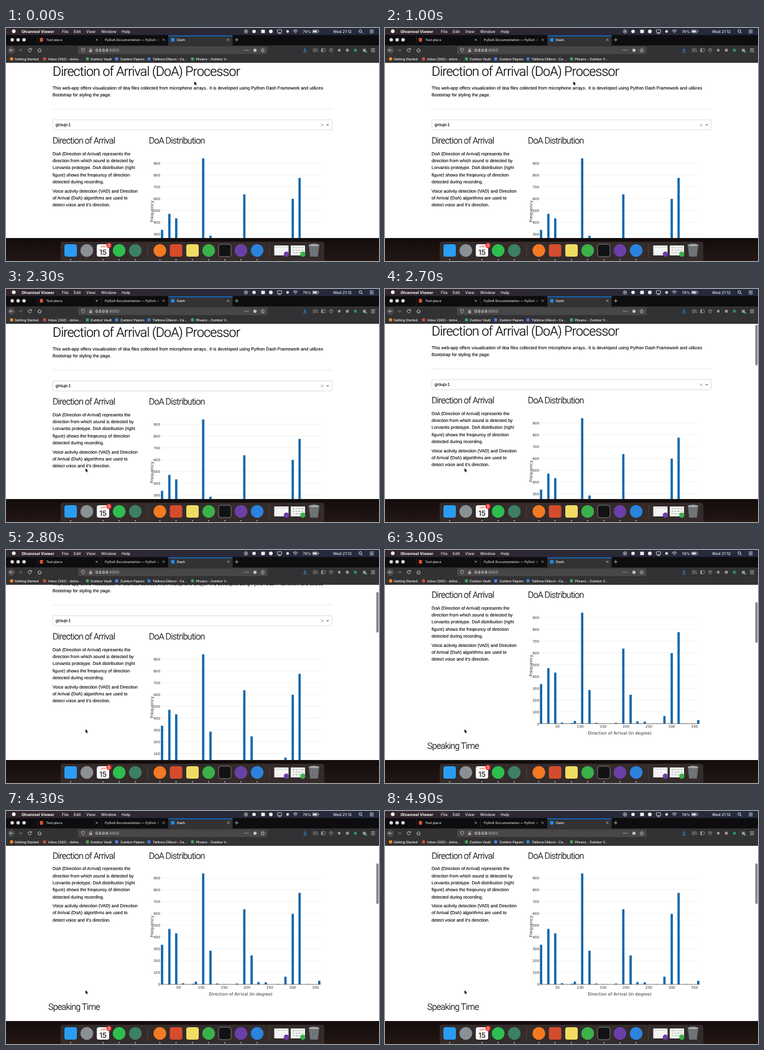
These frames come from a looping animation (600 by 375 pixels, 5 s). An HTML page:

```html
<!DOCTYPE html>
<html lang="en">
<head>
<meta charset="utf-8">
<title>Direction of Arrival (DoA) Processor</title>
<style>
html, body { margin: 0; width: 100%; height: 100%; overflow: hidden; background: #000; }
svg { display: block; width: 600px; height: 375px; }
text { text-rendering: geometricPrecision; white-space: pre; }
.ui { font-family: Inter, "Open Sans", sans-serif; font-weight: 500; }
.body { font-family: "Liberation Sans", Arial, sans-serif; font-size: 7.11px; fill: #000; stroke: #000; stroke-width: .1px; }
.h1, .h3 { font-family: Roboto, Inter, sans-serif; font-weight: 300; fill: #000; stroke: #000; stroke-width: .15px; }
.h1 { font-size: 21.3px; letter-spacing: -.78px; }
.h3 { font-size: 14.2px; letter-spacing: -.69px; }
.plot { font-family: "DejaVu Sans", Verdana, sans-serif; font-size: 5.66px; fill: #2a2a2a; }
.axis { font-size: 6.74px; }
</style>
</head>
<body>
<svg id="stage" viewBox="0 0 600 375" xmlns="http://www.w3.org/2000/svg"></svg>
<script>
const LOOP = 5000, STEP = 100;

// [time, x, y] of the pointer and [time, offset] of the page
const POINTER = [[0, 303, 86], [1200, 303, 86], [1500, 244, 160], [1800, 168, 251], [2300, 128, 288.5], [LOOP, 128, 288.5]];
const SCROLL = [[0, 0], [2600, 0], [2700, 2], [2800, 42], [2900, 92], [3000, 109], [3800, 109], [3900, 109.5], [LOOP, 109.5]];
const BAR_ON = 2600;

const BARS = [[14, 335], [30, 470], [45, 432], [60, 9], [82, 5], [88, 23], [104, 940], [120, 285], [135, 7], [150, 2],
  [178, 7], [194, 636], [210, 245], [225, 19], [241, 17], [268, 2], [284, 65], [300, 597], [315, 775], [333, 2], [358, 30]];

const rect = (x, y, w, h, fill, r = 0, more = "") =>
  `<rect x="${x}" y="${y}" width="${w}" height="${h}" rx="${r}" fill="${fill}" ${more}/>`;
const disc = (x, y, r, fill, more = "") => `<circle cx="${x}" cy="${y}" r="${r}" fill="${fill}" ${more}/>`;
const line = (d, color = "#c9c9cb", w = .9) =>
  `<path d="${d}" fill="none" stroke="${color}" stroke-width="${w}" stroke-linecap="round" stroke-linejoin="round"/>`;
const text = (x, y, str, cls, more = "") => `<text x="${x}" y="${y}" class="${cls}" ${more}>${str}</text>`;
const ui = (x, y, str, size, fill = "#eee", more = "") =>
  text(x, y, str, "ui", `font-size="${size}" fill="${fill}" ${more}`);
const cross = (x, y, r, color, w = .7) =>
  line(`M${x - r} ${y - r}l${2 * r} ${2 * r}M${x + r} ${y - r}l${-2 * r} ${2 * r}`, color, w);
const lines = (x, y, rows) => rows.map((s, i) => text(x, y + i * 11.32, s, "body")).join("");

function menuBar() {
  const items = [[90, "File"], [109, "Edit"], [129, "View"], [153, "Window"], [186, "Help"]];
  return rect(0, 0, 600, 11.6, "url(#menu)") +
    disc(12.5, 5.3, 3, "#eee") +
    ui(25, 7.6, "Olvanreel Viewer", 6.3, "#fff", 'style="font-weight:700"') +
    items.map(([x, s]) => ui(x, 7.6, s, 6.3)).join("") +
    disc(386, 5.5, 2.8, "none", 'stroke="#ddd" stroke-width=".8"') + disc(386, 5.5, 1.2, "#ddd") +
    disc(399, 5.5, 2.8, "#eee") + rect(410.5, 2.8, 6, 5.4, "#eee", .8) + disc(426, 5.5, 3, "#eee") +
    rect(436.5, 2.8, 7, 4.5, "none", .6, 'stroke="#ddd" stroke-width=".9"') + line("M438 9h4", "#ddd") +
    disc(453, 5.5, 2.2, "#ddd") +
    line("M462 4.4q3.5-3 7 0M463.4 6.1q2.1-1.8 4.2 0M465.4 7.8h.2", "#eee", 1) +
    ui(477.5, 7.6, "79%", 6) +
    rect(493, 3.2, 9, 4.6, "none", .9, 'stroke="#ddd" stroke-width=".7"') + rect(494, 4.2, 6, 2.6, "#eee") +
    rect(502.6, 4.6, .9, 1.8, "#ddd") +
    ui(526, 7.6, "Wed 21:12", 6.3) +
    disc(570, 4.9, 2.2, "none", 'stroke="#eee" stroke-width=".9"') + line("M571.7 6.6l1.8 1.8", "#eee") +
    line("M585.5 3.2h5.5M585.5 5.5h5.5M585.5 7.8h5.5", "#eee");
}

function tabs() {
  return rect(0, 11.6, 600, 16.4, "#0d0d0f") +
    [10, 19.5, 29].map(x => disc(x, 19, 2.8, "#dcdcde")).join("") +
    rect(50, 13, .5, 13, "#3a3a3c") + rect(153.3, 13, .5, 13, "#3a3a3c") +
    rect(54.5, 16, 5, 6, "#e0542d", .5) +
    ui(64.5, 21, "Test place", 5.3, "#ddd") + cross(146, 19, 1.4, "#ccc") +
    ui(159, 21, "PyDoA Documentation — PyDoA d", 5.3, "url(#fade)") + cross(253.5, 19, 1.4, "#ccc") +
    rect(261, 11.6, 103.5, 16.4, "#323234") + rect(261, 11.9, 103.5, 1.2, "#0a84ff") +
    rect(265.5, 16.2, 5.6, 5.6, "#1c8cf0", .6) +
    ui(275, 21, "Dash", 5.3, "#fff") + cross(357.5, 19, 1.4, "#ddd") +
    line("M368.6 19h5M371.1 16.5v5", "#ccc", .8);
}

function toolbar() {
  const dim = "#98989b";
  return rect(0, 28, 600, 28, "#323234") +
    disc(8.5, 35.8, 5.3, "#48484b", 'stroke="#606063" stroke-width=".5"') +
    line("M11 35.8h-5M8 33.6l-2.2 2.2 2.2 2.2") +
    line("M20.5 35.8h5M23.4 33.6l2.2 2.2-2.2 2.2", "#77777a") +
    line("M40.6 34.2a2.7 2.7 0 1 0 .3 2.3M41 32.6v1.9h-1.9") +
    line("M51 35.8l3-2.8 3 2.8M52 35.4v3h4v-3") +
    rect(116, 29.6, 304.5, 12.4, "#474749", 1.2) +
    line("M121.6 33.4l2.4-.8 2.4.8q0 4-2.4 5.6q-2.4-1.6-2.4-5.6z", "#bbb", .8) +
    rect(133.9, 35.4, 4.4, 3.2, "#c4c4c6", .4) + line("M134.8 35v-1q1.3-1.7 2.6 0v1", "#c4c4c6", .8) +
    line("M133.6 39.2l5-6.4", "#f04050", .8) +
    ui(144, 38.1, '0.0.0.0<tspan fill="#aeaeb0">:8050</tspan>', 6.2, "#fff") +
    [384, 386.5, 389].map(x => disc(x, 35.8, .7, "#ccc")).join("") +
    disc(400.5, 35.8, 2.6, "#c4c4c6") +
    line("M413 32.8l.9 2.1 2.2.2-1.7 1.4.6 2.2-2-1.2-2 1.2.6-2.2-1.7-1.4 2.2-.2z", "#ccc", .7) +
    line("M481 32.6v4M479.3 35l1.7 1.8 1.7-1.8M478.4 38.8h5.2", "#2f9bf5") +
    line("M494.6 33v5.6M496.6 33v5.6M498.6 33v5.6M500.2 33.2l1.4 5.2", dim, .8) +
    rect(507.2, 33.2, 6.4, 5.2, "none", .7, `stroke="${dim}" stroke-width=".8"`) + rect(507.6, 33.4, 2.2, 4.8, dim) +
    disc(523, 35.8, 2.7, "none", `stroke="${dim}" stroke-width=".8"`) + disc(523, 35, .9, dim) +
    disc(536, 35.8, 2.3, dim) + rect(546.8, 33.5, 4.6, 4.6, dim, 1) + disc(562, 35.8, 2.5, "#2f9068") +
    rect(574, 33.5, 4.8, 4.8, dim, .8) + disc(579.2, 38.4, 1.4, "#35b568") +
    line("M587.6 33.4h5.6M587.6 35.8h5.6M587.6 38.2h5.6");
}

function bookmarks() {
  const marks = [
    [9, "#ff8a1e", 14, "Getting Started"],
    [62, "#d9483b", 68, "Inbox (382) - dolve…"],
    [131, "#3fa65a", 136, "Zumbor Vault"],
    [178, "#4a86e8", 184, "Zumbor Papers"],
    [230, "#3f7fd8", 236, "Tallinna Ülikool – Ca…"],
    [300, "#3fa65a", 305.5, "Plivano - Zumbor V…"]
  ];
  return marks.map(([cx, color, x, s]) => disc(cx, 49.7, 2.6, color) + ui(x, 51.6, s, 5.3, "#fff")).join("");
}

function chart() {
  const zero = 388.5, px = d => 277.5 + (d - 50) * .735, py = n => zero - n * .19;
  let out = "";
  for (let n = 0; n <= 900; n += 100) {
    if (n) out += rect(250, py(n) - .25, 256, .5, "#e6e6e6");
    out += text(248, py(n) + 2.1, n, "plot", 'text-anchor="end"');
  }
  for (let d = 50; d <= 350; d += 50)
    out += text(px(d), 395.2, d, "plot", 'text-anchor="middle"');
  for (const [d, n] of BARS)
    out += rect(px(d) - 1.85, py(n), 3.7, n * .19, "#1168ae");
  return out + rect(249, zero - .3, 257, .7, "#444") +
    text(377.5, 406.3, "Direction of Arrival (In degree)", "plot axis", 'text-anchor="middle"') +
    text(0, 0, "Frequency", "plot axis", 'text-anchor="middle" transform="translate(237.3 295) rotate(-90)"');
}

function page() {
  return text(75, 76.8, "Direction of Arrival (DoA) Processor", "h1") +
    lines(75, 98.6, [
      "This web-app offers visualization of doa files collected from microphone arrays.. It is developed using Python Dash Framework and utilizes",
      "Bootstrap for styling the page."]) +
    rect(75, 130.2, 450, .6, "#dcdcdc") +
    rect(75.3, 147.8, 449.4, 16.2, "#fff", 1.8, 'stroke="#c4c4c4" stroke-width=".6"') +
    text(79.7, 158.3, "group-1", "body") +
    cross(508.6, 156.1, 1.6, "#888", .8) + '<path d="M515 155h5l-2.5 2.6z" fill="#888"/>' +
    text(75, 186, "Direction of Arrival", "h3") + text(229.8, 186, "DoA Distribution", "h3") +
    lines(75, 204.8, [
      "DoA (Direction of Arrival) represents the", "direction from which sound is detected by",
      "Lorvantis prototype. DoA distribution (right", "figure) shows the freqeuncy of direction",
      "detected during recording."]) +
    lines(75, 264.6, [
      "Voice activity detection (VAD) and Direction", "of Arrival (DoA) algorithms are used to",
      "detect voice and it's direction."]) +
    chart() + text(68, 429, "Speaking Time", "h3");
}

function dock() {
  const square = (x, c, more) => rect(x - 10, 348, 20, 20, c, 3.5, more);
  const round = (x, c, more) => disc(x, 358, 10.3, c, more);
  const mini = x => rect(x - 11.5, 350, 23, 16, "#f4f4f4", .6);
  let cells = "";
  for (let i = 0; i < 12; i++)
    cells += rect(461 + i % 4 * 4.8, 353 + Math.floor(i / 4) * 4, 3, 1.2, i % 3 ? "#b4b4b4" : "#79b979");
  return rect(0, 338.2, 600, 37, "url(#desk)") +
    rect(88.5, 344.5, 423, 34, "#342b2b", 3, 'stroke="#443a39" stroke-width=".5"') +
    square(104, "#2a9df2") + round(130, "#8b9095") +
    square(156, "#fafafa") + ui(156, 353.4, "JAN", 4, "#e0402f", 'text-anchor="middle"') +
    ui(156, 364.6, "15", 11.5, "#222", 'text-anchor="middle"') +
    disc(165.5, 350, 4.2, "#f0403a") + ui(165.5, 352, "3", 5.5, "#fff", 'text-anchor="middle"') +
    round(182, "#2dbe4f") + round(208, "#3d7f62") +
    rect(227.5, 348, .6, 22, "#5a5151") +
    round(247.5, "#f37a22") + square(273.5, "#d54c2c") + square(300, "#efdc62") +
    round(326, "#3ab14a") + square(352, "#121214", 'stroke="#8a8a8c" stroke-width=".9"') +
    round(378, "#6b3fa8") + round(404, "#2b83dd") +
    rect(423.5, 348, .6, 22, "#5a5151") +
    mini(443) + rect(433, 352, 20, 1.2, "#d0d0d0") + disc(451, 364, 4.2, "#6b3fa8") +
    mini(469.5) + cells + disc(477.5, 364, 4.2, "#3ab14a") +
    '<path d="M487 349h17l-2.2 19h-12.6z" fill="#6c6f71"/><ellipse cx="495.5" cy="349.3" rx="8.6" ry="2" fill="#a4a7a9"/>' +
    line("M491 353l1 13M495.5 353v13M500 353l-1 13", "#85888a", .7) +
    [104, 156, 182, 208, 247.5, 273.5, 300, 326, 352, 378, 404].map(x => disc(x, 373, .9, "#c8c8c8")).join("");
}

const stage = document.getElementById("stage");
stage.innerHTML = `<defs>
  <linearGradient id="fade" gradientUnits="userSpaceOnUse" x1="159" x2="249" y1="0" y2="0">
    <stop offset=".86" stop-color="#ddd"/><stop offset="1" stop-color="#ddd" stop-opacity="0"/></linearGradient>
  <linearGradient id="menu">
    <stop offset="0" stop-color="#32262d"/><stop offset="1" stop-color="#232a3e"/></linearGradient>
  <linearGradient id="desk" x1="0" x2="0" y1="0" y2="1">
    <stop offset="0" stop-color="#120c0b"/><stop offset="1" stop-color="#241714"/></linearGradient>
  <clipPath id="view"><rect x="0" y="56" width="600" height="282.2"/></clipPath></defs>` +
  rect(0, 56, 600, 282.2, "#fff") +
  `<g clip-path="url(#view)"><g id="page">${page()}</g></g>` +
  rect(595.6, 57, 3.8, 65.4, "#858585", 1.9, 'id="thumb"') +
  menuBar() + tabs() + toolbar() + bookmarks() + dock() +
  '<path id="pointer" d="M0 0v5.7l1.3-1.2.9 2 1-.4-.9-2h1.8z" fill="#000" stroke="#fff" stroke-width=".5" paint-order="stroke"/>';

const pageEl = document.getElementById("page");
const thumb = document.getElementById("thumb");
const pointer = document.getElementById("pointer");

function at(table, t) {
  const i = Math.max(1, table.findIndex(k => k[0] >= t));
  const a = table[i - 1], b = table[i], p = (t - a[0]) / (b[0] - a[0]);
  return a.slice(1).map((v, j) => v + (b[j + 1] - v) * p);
}

function draw(t) {
  const [x, y] = at(POINTER, t), [offset] = at(SCROLL, t);
  pageEl.setAttribute("transform", `translate(0 ${-offset})`);
  thumb.setAttribute("y", 57 + offset * .248);
  thumb.setAttribute("visibility", t >= BAR_ON ? "visible" : "hidden");
  pointer.setAttribute("transform", `translate(${x} ${y})`);
}

const start = performance.now();
function tick() {
  const t = (performance.now() - start) % LOOP;
  draw(Math.floor(t / STEP) * STEP);
  requestAnimationFrame(tick);
}
tick();
</script>
</body>
</html>
```
